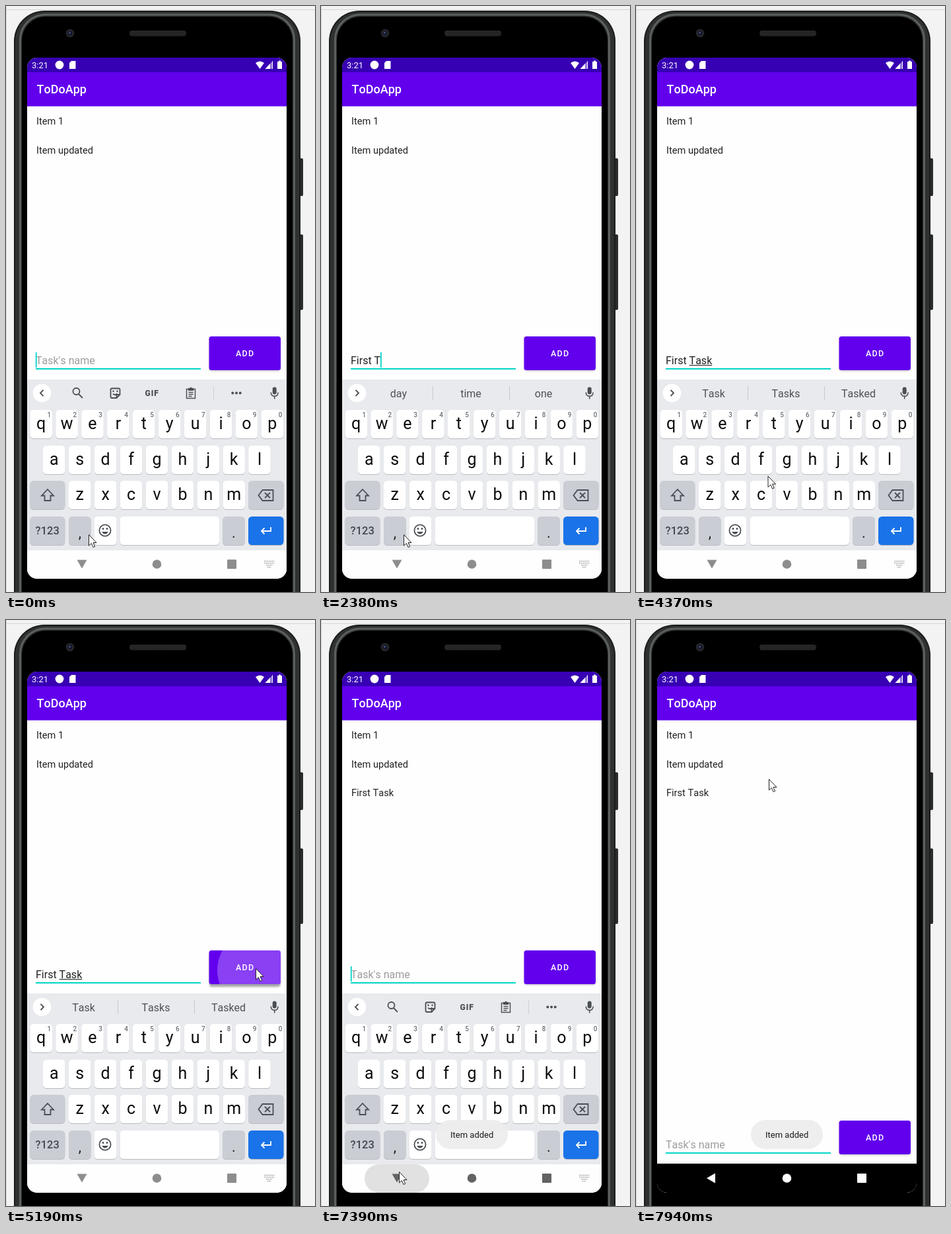
An HTML page for the animation above (8000 ms loop, 468 by 885 pixels).

```html
<!DOCTYPE html>
<html lang="en">
<head>
<meta charset="utf-8">
<title>To-do list</title>
<style>
  html, body { margin: 0; width: 100%; height: 100%; overflow: hidden; background: #f3f3f3; }
  svg { display: block; width: 468px; height: 885px; }
  text { font-family: Roboto, Arial, sans-serif; font-kerning: none; white-space: pre; }
  .mid { text-anchor: middle; }
  .line { fill: none; stroke: #4b4f55; stroke-width: 1.8; }
  .item { font-size: 14.6px; fill: #212121; }
  .field { font-size: 16px; fill: #212121; }
  .word { font-size: 16px; fill: #4d5156; }
  .key { font-size: 25px; fill: #0c0c0c; }
  .hint { font-size: 10px; font-weight: 500; fill: #6b6f75; }
</style>
</head>
<body>
<svg viewBox="0 0 468 885">
  <defs>
    <clipPath id="screen"><rect x="32" y="78" width="393" height="787" rx="15"/></clipPath>
    <clipPath id="btnClip"><rect x="307.5" y="499" width="108.5" height="51" rx="3.5"/></clipPath>
    <pattern id="mesh" width="3" height="3" patternUnits="userSpaceOnUse">
      <rect width="3" height="3" fill="#292929"/><circle cx="1.5" cy="1.5" r=".8" fill="#121212"/>
    </pattern>
    <filter id="soft" x="-20%" y="-40%" width="140%" height="190%"><feGaussianBlur stdDeviation="1.8"/></filter>
  </defs>

  <rect width="468" height="885" fill="#f3f3f3"/>
  <path d="M0 5.5H468M.5 0V885" stroke="#d6d6d6"/>

  <g id="phone">
    <rect x="443" y="230" width="7" height="57" rx="2" fill="#2a2c2c"/>
    <rect x="443" y="345" width="7" height="114" rx="2" fill="#2a2c2c"/>
    <rect x="12" y="7" width="434" height="960" rx="46" fill="#1b1c1c"/>
    <rect x="14" y="9" width="430" height="960" rx="44" fill="#2f3131"/>
    <rect x="21.5" y="13" width="415" height="960" rx="38" fill="none" stroke="#5c5f5f" stroke-width="3"/>
    <rect x="24" y="16" width="410" height="960" rx="36" fill="#000"/>
    <circle cx="97" cy="41" r="6.3" fill="#25262b"/>
    <circle cx="97" cy="41" r="3.4" fill="#15172a"/>
    <circle cx="96.5" cy="40.5" r="1.4" fill="#4a5078"/>
    <rect x="187" y="37" width="86" height="8.5" rx="4" fill="url(#mesh)"/>
  </g>

  <g clip-path="url(#screen)">
    <rect x="32" y="78" width="393" height="787" fill="#fefefe"/>
    <rect x="32" y="100" width="393" height="51.5" fill="#6200ee"/>
    <rect x="32" y="78" width="393" height="22" fill="#3700b3"/>
    <g fill="#fff">
      <text x="39" y="94" font-size="13">3:21</text>
      <circle cx="81" cy="89" r="6.4"/>
      <path d="M99 83H105.5V95H96V86Z"/>
      <path d="M378 86Q384.5 81 391 86L384.5 95Z"/>
      <path d="M404 83V95H392.5Z" fill-opacity=".45"/>
      <path d="M400 87V95H392.5ZM404 83V95H403V84Z"/>
      <path d="M413 82.5H416V84H418V95H411V84H413Z"/>
      <text x="46.5" y="132" font-size="18" font-weight="500">ToDoApp</text>
    </g>
    <text class="item" x="46" y="179">Item 1</text>
    <text class="item" x="46" y="222.5">Item updated</text>
    <text class="item" x="46" y="266" id="added">First Task</text>

    <g id="form">
      <text class="field" x="45" y="541" id="hint" style="fill:#9c9c9c">Task's name</text>
      <text class="field" x="45" y="541" id="typed"></text>
      <rect id="compose" y="542" height="1.2" fill="#333"/>
      <rect x="45" y="547" width="250" height="2" fill="#03d5c5"/>
      <rect id="caret" y="523" width="1.8" height="23" fill="#03d5c5"/>
      <rect id="shade" x="308" width="107.5" height="51" rx="4" filter="url(#soft)"/>
      <g clip-path="url(#btnClip)">
        <rect x="307" y="499" width="110" height="51" fill="#6200ee"/>
        <circle id="ripple" cx="380" cy="529" fill="#fff"/>
      </g>
      <text x="348" y="529" font-size="12.5" font-weight="500" letter-spacing="1.2" fill="#fff">ADD</text>
    </g>

    <g id="board">
      <rect x="32" y="564" width="393" height="258" fill="#e8eaed"/>
      <circle cx="54.5" cy="584.5" r="13.8" fill="#fff"/>
      <path id="chev" class="line"/>
      <g id="tools">
        <circle class="line" cx="106.5" cy="582" r="5"/>
        <path class="line" d="M110 586L116 592"/>
        <path class="line" d="M160.5 577.5H170.5Q172.5 577.5 172.5 579.5V587L167.5 592H160.5Q158.500 592 158.5 590V579.5Q158.5 577.5 160.5 577.5ZM172 587H167.5V592M162 585.5Q165 589 168.5 585.5"/>
        <path d="M161.5 580.5h2v2.5h-2zM167.5 580.5h2v2.5h-2z" fill="#4b4f55"/>
        <text x="210.5" y="588.5" font-size="12" font-weight="900" letter-spacing="1" fill="#4b4f55">GIF</text>
        <path class="line" d="M273.5 578.5H286.5V592.5H273.5ZM276.5 583.5H283.5M276.5 586.5H283.5M276.5 589.5H281.5" style="stroke-width:1.5"/>
        <path d="M276 577H278.5Q280 574 281.5 577H284V581H276Z" fill="#4b4f55"/>
        <path d="M314.5 574V595" stroke="#cdd0d4"/>
        <g fill="#4b4f55"><circle cx="343.3" cy="584.5" r="2"/><circle cx="349" cy="584.5" r="2"/><circle cx="354.7" cy="584.5" r="2"/></g>
      </g>
      <g id="words">
        <path d="M169.5 574V595M285.5 574V595" stroke="#c6c9cd"/>
        <text class="word mid" x="117.5" y="590.5"></text>
        <text class="word mid" x="227" y="590.5"></text>
        <text class="word mid" x="337" y="590.5"></text>
      </g>
      <rect x="403.7" y="575.5" width="6" height="11" rx="3" fill="#4b4f55"/>
      <path class="line" d="M401.3 583.5Q401.3 589.3 406.7 589.3T412.1 583.5M406.7 589V593.5" style="stroke-width:1.6"/>
      <g id="keys"></g>
      <path class="line" d="M63 730L72 739.5H67.5V747H58.5V739.5H54Z"/>
      <path class="line" d="M388.5 731H404.5V747H388.5L382.5 739ZM392 735L400 743M400 735L392 743"/>
      <path class="line" d="M401 787V793H387M391.5 788.5L387 793L391.5 797.5" style="stroke:#fff"/>
      <circle class="line" cx="150" cy="792" r="8.6"/>
      <path d="M145.3 794H154.7Q153 797.5 150 797.5T145.3 794Z" fill="#4b4f55"/>
      <circle cx="147" cy="789.5" r="1.4" fill="#4b4f55"/><circle cx="153" cy="789.5" r="1.4" fill="#4b4f55"/>
    </g>

    <rect id="navBg" x="32" width="393" height="45"/>
    <rect id="press" y="822" height="43" rx="21.5" fill="#e1e1e1"/>
    <g id="nav">
      <path id="back"/>
      <circle cx="228.5" cy="843" r="6.8"/>
      <rect x="335" y="836" width="14" height="14" rx="1"/>
      <path id="kbIcon" d="M391.5 838.5H407M391.5 841.5H407M394.5 844.5H404M396 847.5H402" stroke="#8d8d8d" stroke-width="1.4" stroke-dasharray="1.5 1.5"/>
    </g>
    <g id="toast">
      <rect x="174" y="755" width="109" height="44" rx="22" fill="#eee" fill-opacity=".96"/>
      <text x="196" y="782" font-size="13" fill="#1c1c1c">Item added</text>
    </g>
  </g>
  <path id="mouse" d="M0 0V16.5L3.9 13L6.6 19L9.2 17.9L6.5 12H11.5Z" fill="#fff" stroke="#222"/>
</svg>
<script>
const $ = id => document.getElementById(id);
const set = (el, attrs) => { for (const k in attrs) el.setAttribute(k, attrs[k]); };
const show = (el, on) => { el.style.display = on ? '' : 'none'; };

function add(tag, attrs, label) {
  const el = document.createElementNS('http://www.w3.org/2000/svg', tag);
  set(el, attrs);
  if (label) el.textContent = label;
  $('keys').append(el);
}
function keyBox(x, y, width, fill) {
  add('rect', { x, y: y + 1, width, height: 43, rx: 5.5, fill: '#b9bcc1' });
  add('rect', { x, y, width, height: 43, rx: 5.5, fill });
}
const pitch = 38.9, grey = '#cacdd4';
[['qwertyuiop', 36.4, 610], ['asdfghjkl', 56, 664], ['zxcvbnm', 95, 717]].forEach(([row, left, y], r) => {
  [...row].forEach((c, i) => {
    const x = left + i * pitch;
    keyBox(x, y, 33.6, '#fff');
    add('text', { class: 'key mid', x: x + 16.8, y: y + 28.8 }, c);
    if (!r) add('text', { class: 'hint mid', x: x + 29, y: 621 }, String((i + 1) % 10));
  });
});
keyBox(36.4, 717, 53, grey);
keyBox(367, 717, 53.5, grey);
keyBox(36.4, 771, 53, grey);
keyBox(95, 771, 33.6, grey);
keyBox(133.5, 771, 34, '#fff');
keyBox(172.5, 771, 150.5, '#fff');
keyBox(328, 771, 34, grey);
keyBox(367, 771, 53.5, '#1a73e8');
add('text', { class: 'mid', x: 62.7, y: 798, 'font-size': 16.5, 'font-weight': 500, fill: '#44484e' }, '?123');
add('text', { class: 'mid', x: 111.8, y: 803, 'font-size': 22, fill: '#222' }, ',');
add('text', { class: 'mid', x: 345, y: 803, 'font-size': 22, fill: '#222' }, '.');

// Each track lists [start time, value]; values hold until the next start.
const tracks = {
  text: [[0, ''], [660, 'F'], [800, 'Fi'], [940, 'Fir'], [1210, 'Firs'], [1330, 'First'], [1600, 'First '],
    [2380, 'First T'], [3140, 'First Ta'], [3290, 'First Tas'], [3440, 'First Task'], [5330, '']],
  words: [[0, ''], [800, 'F For First'], [1330, 'First Firsts Forst'], [1850, 'day time one'],
    [2520, 'T Time Thing'], [3580, 'Task Tasks Tasked'], [5470, '']],
  caret: [[0, 1], [120, 0], [520, 1], [2780, 0], [3140, 1], [4240, 0], [4640, 1], [5190, 0], [5330, 1],
    [5750, 0], [6330, 1], [6830, 0], [7240, 1], [7800, 0]],
  ripple: [[0, [0, 0]], [5190, [60, .25]], [5330, [90, .25]], [5470, [90, .16]], [5610, [90, .06]], [5750, [0, 0]]],
  toast: [[0, 0], [5470, .3], [5610, .7], [5750, 1]],
  press: [[0, [0, 0]], [7240, [60, .7]], [7390, [98, 1]], [7520, [98, .5]], [7660, [0, 0]]],
  slide: [[0, 0], [7520, 120], [7660, 300]],
  mouse: [[0, [125.5, 798.5]], [4240, [140, 780]], [4370, [200, 710]], [4510, [285, 620]], [4640, [350, 555]],
    [4780, [374, 531]], [4910, [378.5, 526.5]], [6330, [360, 550]], [6460, [300, 640]], [6590, [220, 745]],
    [6720, [150, 820]], [6850, [125, 840]], [6970, [118, 845]], [7240, [118.5, 833.5]], [7800, [165, 500]],
    [7940, [201.5, 240.5]]]
};
const at = (name, t) => tracks[name].findLast(([start]) => start <= t)[1];

function draw(t) {
  const text = at('text', t), words = at('words', t), slide = at('slide', t);
  const typed = $('typed'), dark = t >= 7660;
  const width = s => { typed.textContent = s; return s ? typed.getComputedTextLength() : 0; };

  const split = text.startsWith('First ') ? 6 : 0;
  const from = width(text.slice(0, split)), end = width(text);
  set($('compose'), { x: 45 + from, width: text.length > split + 1 ? end - from : 0 });
  set($('caret'), { x: 44.8 + end });
  show($('caret'), at('caret', t));
  show($('hint'), !text);
  show($('added'), t >= 5330);

  show($('tools'), !words);
  show($('words'), words);
  const list = words.split(' ');
  document.querySelectorAll('.word').forEach((el, i) => { el.textContent = list[i] || ''; });
  set($('chev'), { d: words ? 'M52.5 580L57 584.5L52.5 589' : 'M56.5 580L52 584.5L56.5 589' });

  const [r, glow] = at('ripple', t);
  set($('ripple'), { r, opacity: glow });
  set($('shade'), { opacity: glow ? .35 : .2, y: glow ? 503 : 500.5 });
  set($('toast'), { opacity: at('toast', t) });

  const [pw, po] = at('press', t);
  set($('press'), { x: 115 - pw / 2, width: pw, opacity: po });
  set($('form'), { transform: `translate(0 ${slide ? 257 : 0})` });
  set($('board'), { transform: `translate(0 ${slide})` });
  set($('navBg'), { fill: dark ? '#000' : '#fefefe', y: dark ? 821 : 822 });
  set($('nav'), { fill: dark ? '#fff' : po ? '#636363' : '#8d8d8d' });
  set($('back'), { d: dark ? 'M107 843L120 835.5V850.5Z' : 'M107.5 836.5H122.5L115 849.5Z' });
  show($('kbIcon'), !dark);
  set($('mouse'), { transform: `translate(${at('mouse', t)})` });
}

const begin = performance.now();
function tick() {
  draw((performance.now() - begin) % 8000);
  requestAnimationFrame(tick);
}
tick();
</script>
</body>
</html>
```
